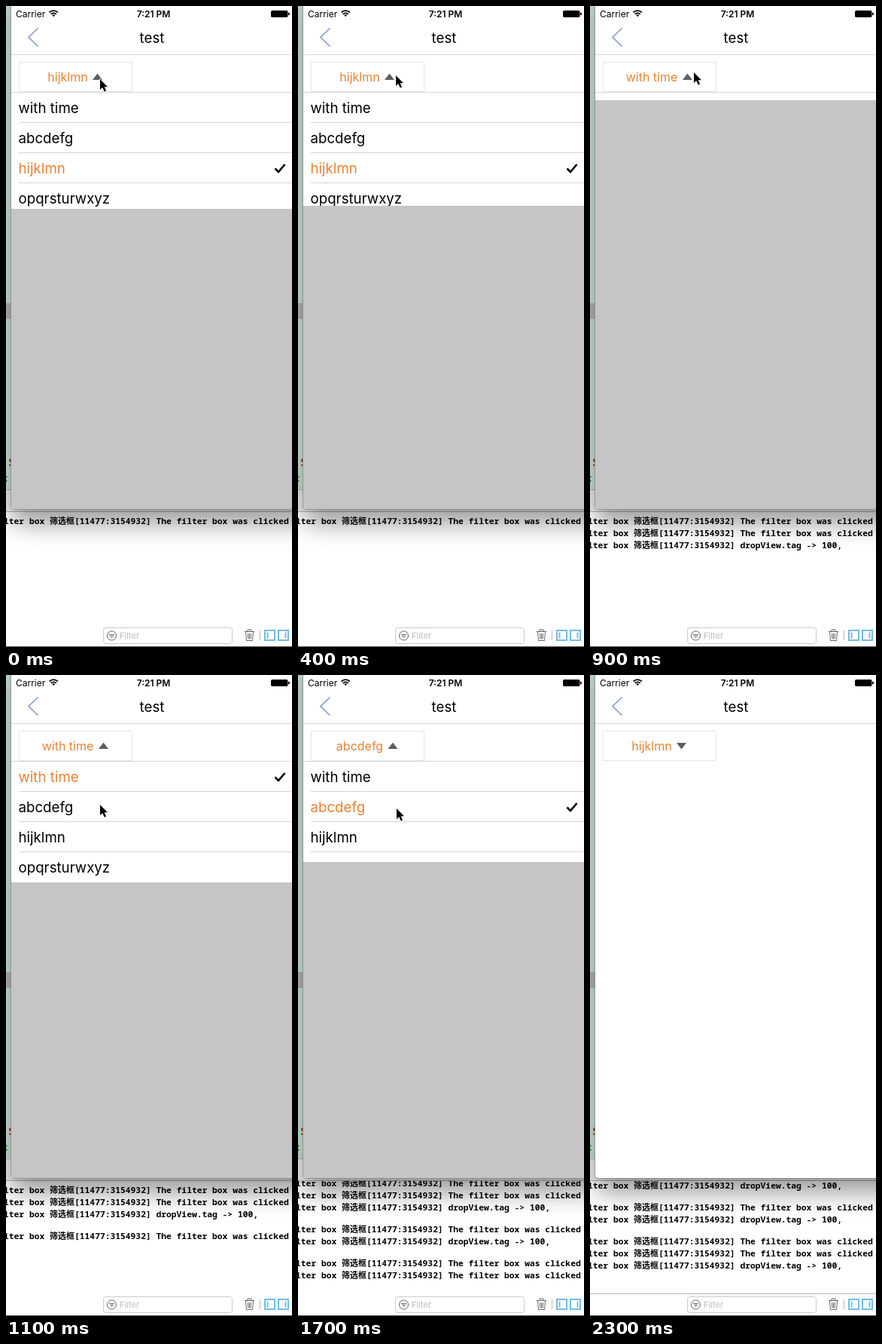
An HTML page for the animation above (2400 ms loop, 380 by 850 pixels).

```html
<!DOCTYPE html>
<html lang="en">
<head>
<meta charset="utf-8">
<title>Drop-down filter</title>
<style>
  html, body { margin: 0; width: 100%; height: 100%; overflow: hidden; background: #fff; }
  svg { display: block; }
  text { font-family: Inter, Roboto, sans-serif; white-space: pre; }
  .mono { font: bold 11.3px "Noto Sans Mono", "Noto Sans CJK SC", "Noto Sans CJK", monospace; }
  .mono tspan { font-size: 11px; }
  .row { font-size: 18.7px; }
  .line { fill: none; stroke: #d6d6d8; }
</style>
</head>
<body>
<svg width="380" height="850" viewBox="0 0 380 850">
  <defs>
    <filter id="soft" filterUnits="userSpaceOnUse" x="-60" y="-60" width="560" height="860">
      <feGaussianBlur stdDeviation="16"/>
    </filter>
    <clipPath id="console"><rect y="671" width="380" height="149"/></clipPath>
    <clipPath id="drop"><rect id="dropBox" x="7" y="115" width="373"/></clipPath>
  </defs>

  <!-- editor behind the phone -->
  <rect width="8" height="642" fill="#cce6d8"/>
  <rect y="394" width="8" height="21" fill="#b4b8b6"/>
  <text class="mono" x="3" y="610" style="font-size:14px" fill="#b5201c">S</text>
  <text class="mono" x="-4" y="631" style="font-size:14px" fill="#1c7a3c">::</text>
  <rect y="642" width="380" height="28" fill="#f0f0f0"/>
  <path d="M0 641.5H380M0 670.5H380" stroke="#b4b4b4"/>

  <rect x="7" y="-10" width="460" height="697" rx="10" opacity=".38" filter="url(#soft)"/>
  <g clip-path="url(#console)"><g id="log"></g></g>

  <!-- toolbar -->
  <path id="barLine" d="M0 820.5H380" stroke="#b8b8b8"/>
  <rect x="129.5" y="824.5" width="171" height="21" rx="3" fill="#fff" stroke="#cbcbcb"/>
  <g fill="none" stroke="#666">
    <circle cx="140.5" cy="835" r="6"/>
    <path d="M137 833.5h7M138 835.5h5M139.5 837.5h2"/>
    <path d="M317 829.5h13M321 829v-2h5v2M318.5 830l1 11.5h8l1-11.5M321.5 832l.4 7.5M323.5 832v7.5M325.5 832l-.4 7.5"/>
  </g>
  <text x="151" y="839" font-size="11" fill="#bcbcbc">Filter</text>
  <path d="M337.5 828v13" stroke="#bbb"/>
  <path d="M344 828h13v13h-13zM362 828h13v13h-13zM347.5 830.5v8M371.5 830.5v8" fill="none" stroke="#74bce4" stroke-width="2"/>
  <path d="M0 849.5H380" stroke="#555"/>

  <!-- phone -->
  <path d="M7 0H380V667H11q-4 0-4-4z" fill="#fff"/>
  <path d="M6.5 0V663q0 4.500 4.500 4.500H380" fill="none" stroke="#8d8d8d" stroke-opacity=".75"/>
  <text x="13" y="14.500" font-size="12">Carrier</text>
  <g fill="none" stroke="#000" stroke-width="1.700">
    <path d="M57.500 8.500q5.700-4.700 11.400 0M59.600 10.800q3.600-2.900 7.200 0"/>
    <path d="M61.300 12l1.900 2.300 1.900-2.300q-1.900-1.300-3.800 0z" fill="#000" stroke="none"/>
  </g>
  <text x="196" y="14.500" font-size="12" font-weight="600" text-anchor="middle">7:21 PM</text>
  <rect x="352" y="6" width="22.500" height="9" rx="1.800"/>
  <rect x="375" y="8.800" width="1.800" height="3.400" rx=".8"/>
  <path d="M42.500 29.500L30 41.500l12.500 12" fill="none" stroke="#8799c6" stroke-width="1.600"/>
  <text x="194" y="49" font-size="18.700" text-anchor="middle">test</text>
  <path class="line" d="M7 64.500H380"/>
  <rect x="17.500" y="74.500" width="150" height="39" fill="#fff" stroke="#e6e6e6"/>
  <text id="label" x="82" y="99.700" font-size="16" text-anchor="middle" fill="#ee8031"></text>
  <path id="arrow" fill="#5f5f5f"/>

  <g id="menu">
    <rect x="7" y="115" width="373" height="552" fill="#c5c5c7"/>
    <path class="line" d="M7 114.500H380"/>
    <g clip-path="url(#drop)">
      <rect x="7" y="115" width="373" height="160" fill="#fff"/>
      <path class="line" d="M17 154.500H380M17 194.500H380M17 234.500H380"/>
      <g id="rows"></g>
      <path id="check" d="M357.500 215.500l4.500 4.500 8.500-10" fill="none" stroke="#000" stroke-width="2.600"/>
    </g>
  </g>
  <path id="cursor" d="M0 0V14l3.200-2.900 2.500 5.400 2.400-1-2.400-5.200H10z" stroke="#fff" stroke-width="1.200" paint-order="stroke"/>
</svg>
<script>
const $ = id => document.getElementById(id);
const STEP = 100, STEPS = 24;
const items = ['with time', 'abcdefg', 'hijklmn', 'opqrsturwxyz'];
const arrowX = [129.5, 126, 121.5];

// Everything below is counted in steps of 100 ms.
const heights = [154, 40, 0, 0, 150, 160, 0, 0, 0, 10, 160, 160,
                 0, 120, 160, 40, 0, 133, 160, 160, 150, 30, 0, 0];
const picks = [[0, 2], [6, 0], [12, 1], [20, 2]];            // step, chosen item
const path = [[0, 125, 97], [3, 137, 82], [4, 130, 92], [6, 118, 143], [9, 138, 88],
              [11, 125, 172], [12, 126, 150], [13, 130, 95], [14, 129, 305], [15, 129, 300],
              [16, 130, 95], [17, 131, 177], [19, 131, 212], [22, 131, 215]];
const logSteps = [0, 5, 7, 10, 12, 14, 17, 21];
const logKinds = 'cctctcct';

let y = 687;
$('log').innerHTML = [...logKinds].map(kind => {
  const message = kind === 'c' ? 'The filter box was clicked' : 'dropView.tag -&gt; 100,';
  const line = `<text class="mono" x="-3" y="${y}">lter box <tspan>筛选框</tspan>[11477:3154932] ${message}</text>`;
  y += kind === 'c' ? 16 : 29;
  return line;
}).join('');
$('rows').innerHTML = items.map((item, i) =>
  `<text class="row" x="16.5" y="${141.5 + 40 * i}">${item}</text>`).join('');

const show = (el, on) => el.setAttribute('visibility', on ? 'inherit' : 'hidden');

function cursorAt(step) {
  const i = Math.max(1, path.findIndex(p => p[0] >= step));
  const [a, b] = [path[i - 1], path[i]];
  const k = (step - a[0]) / (b[0] - a[0]);
  return [1, 2].map(n => a[n] + (b[n] - a[n]) * k);
}

function draw(step) {
  const height = heights[step];
  const pick = picks.filter(p => p[0] <= step).pop()[1];
  const logged = logSteps.filter(s => s <= step).length;

  $('label').textContent = items[pick];
  $('arrow').setAttribute('d', `M${arrowX[pick] - 6.5} ${height ? '98h13l-6.500-8.500z' : '90h13l-6.500 8.500z'}`);
  show($('menu'), height);
  $('dropBox').setAttribute('height', height);
  [...$('rows').children].forEach((row, i) => row.setAttribute('fill', i === pick ? '#ee8031' : '#000'));
  $('check').setAttribute('transform', `translate(0 ${40 * (pick - 2)})`);

  const scroll = logged > 7 ? 38 : logged > 6 ? 9 : 0;
  $('log').setAttribute('transform', `translate(0 ${-scroll})`);
  [...$('log').children].forEach((line, i) => show(line, i < logged));
  show($('barLine'), scroll > 9);

  show($('cursor'), step < 22);
  if (step < 22) $('cursor').setAttribute('transform', `translate(${cursorAt(step)})`);
}

const start = performance.now();
let last = -1;
function tick() {
  const step = Math.floor((performance.now() - start) / STEP) % STEPS;
  if (step !== last) draw(last = step);
  requestAnimationFrame(tick);
}
tick();
</script>
</body>
</html>
```
